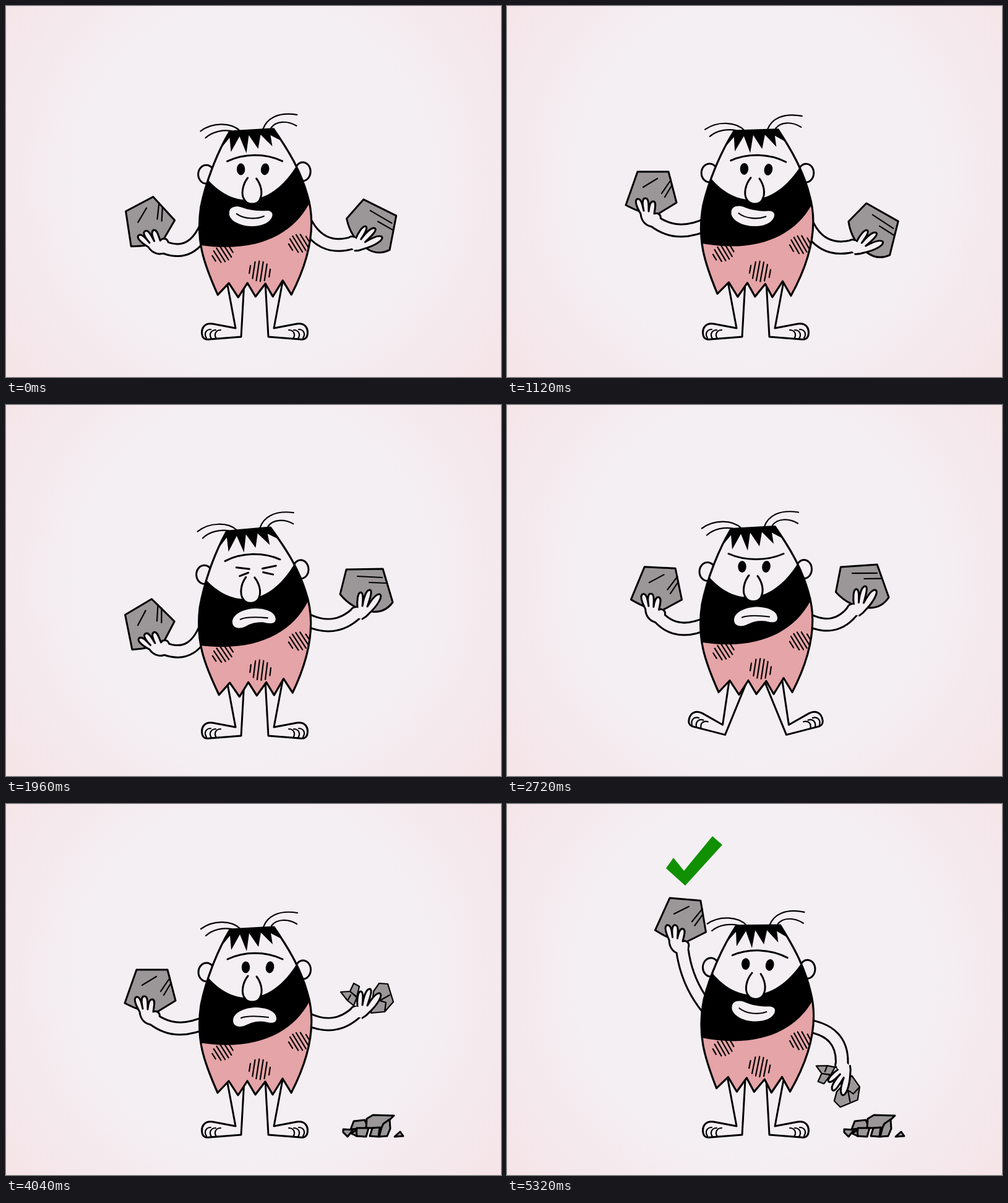
An HTML page that plays this animation: 800x600 px, repeating every 5.4 s.

```html
<!DOCTYPE html>
<html lang="en">
<head>
<meta charset="utf-8">
<title>Weighing stones</title>
<style>
html, body { margin: 0; width: 100%; height: 100%; overflow: hidden; background: #f4eff3; }
svg { display: block; width: 800px; height: 600px; }
path, ellipse { stroke-linejoin: round; stroke-linecap: round; }
.line { fill: none; stroke: #000; stroke-width: 3; }
.thin { fill: none; stroke: #000; stroke-width: 2.2; }
.skin { fill: #f4eff3; stroke: #000; stroke-width: 3; }
.plain { fill: #f4eff3; }
.rock { fill: #9b9799; stroke: #000; stroke-width: 3; }
.arm, .armFill { fill: none; stroke-linecap: butt; }
.arm { stroke: #000; stroke-width: 22.6; }
.armFill { stroke: #f4eff3; stroke-width: 16.6; stroke-linecap: round; }
</style>
</head>
<body>
<svg viewBox="0 0 800 600">
  <defs>
    <radialGradient id="bg" gradientUnits="userSpaceOnUse" cx="400" cy="280" r="510">
      <stop offset=".55" stop-color="#f4eff3"/>
      <stop offset="1" stop-color="#f5e4e8"/>
    </radialGradient>
    <path id="shape" d="M362 203L433 199C453 228 475 262 487 305C501 350 493 405 461 467L447 444L431 470L419 449L403 470L390 448L375 471L360 448L342 467C319 415 307 380 315 325C323 285 341 238 362 203Z"/>
    <clipPath id="inside"><use href="#shape"/></clipPath>
    <path id="toe" class="thin" d="M324 537C319 529 324 523 331 523"/>
    <g id="leg">
      <path class="skin" d="M357 446L371 521L334 514C320 512 315 522 317 532C318 538 323 540 329 539L380 535L385 446"/>
      <use href="#toe"/><use href="#toe" x="8" y="1"/><use href="#toe" x="16" y="1"/>
    </g>
  </defs>
  <rect width="800" height="600" fill="url(#bg)"/>

  <g id="legL"><use href="#leg"/></g>
  <g id="legR"><use href="#leg" transform="translate(804 0) scale(-1 1)"/></g>

  <path id="armL" class="arm"/>
  <g id="handL"><g transform="translate(-238 -348)">
    <path class="rock" d="M211 268L261 268L274 318L243 337Q222 338 192 322Z"/>
    <path class="thin" d="M220 293L243 279M250 303L265 281M255 309L267 289"/>
    <path class="skin" d="M240 357C225 358 217 348 216 336C210 326 205 314 211 312C217 311 219 322 221 331C218 318 219 310 224 311C229 311 229 320 229 332C230 322 232 315 237 316C242 318 239 327 238 336C242 334 250 336 248 345"/>
  </g></g>
  <path id="fillL" class="armFill"/>

  <path id="armR" class="arm"/>
  <g id="handR"><g transform="translate(-567 -336)">
    <g id="whole">
      <path class="rock" d="M550 266L609 265L625 319Q612 337 590 334Q560 331 540 306Z"/>
      <path class="thin" d="M568 277L608 279M587 287L614 288"/>
    </g>
    <path id="broken" class="rock" style="stroke-width:2.2" d="M541 304L556 303L567 313L562 326L552 318ZM562 290L571 295L567 312L556 303ZM552 318L557 309M603 290L617 291L626 320L612 336L590 338L594 303ZM604 318L620 309M604 318L614 321L612 336"/>
    <path class="skin" d="M560 343C553 332 560 324 568 329C567 318 568 304 573 303C578 303 577 315 576 325C578 312 582 299 588 299C593 300 588 314 584 326C590 316 598 305 604 306C610 309 600 325 587 337Q582 343 576 346"/>
  </g></g>
  <path id="fillR" class="armFill"/>

  <g id="body">
    <ellipse class="skin" cx="324" cy="272" rx="13" ry="15"/>
    <ellipse class="skin" cx="480" cy="268" rx="12.5" ry="15"/>
    <path class="thin" d="M379 202C365 188 335 187 315 202M365 202C352 200 335 202 323 213M416 199C422 182 440 171 471 176M429 197C437 186 455 185 470 194"/>
    <use href="#shape" fill="#e5a4a7"/>
    <g clip-path="url(#inside)">
      <path class="plain" d="M300 190H500V300L400 340L300 300Z"/>
      <path d="M300 240C345 332 425 340 475 250L510 280L490 320C462 373 398 403 300 384Z"/>
      <path d="M362 203L433 199L447 219L428 209L431 227L412 208L408 231L393 209L389 238L378 211L364 236L362 213L347 231Z"/>
    </g>
    <use href="#shape" fill="none" stroke="#000" stroke-width="3.2" stroke-linejoin="round"/>
    <path id="patches" class="thin"/>
    <path id="brow" class="line"/>
    <g id="eyes">
      <g id="open">
        <ellipse cx="380" cy="264" rx="6.7" ry="9.5"/>
        <ellipse cx="419" cy="264" rx="6.7" ry="9.5" transform="rotate(9 419 264)"/>
      </g>
      <path id="shut" class="line" d="M370 262l21 3M375 276l14 -5M412 265l22 -4M413 271l16 4"/>
    </g>
    <path class="skin" d="M391 278C383 288 379 305 386 314C391 322 405 322 410 314C417 302 411 287 405 279"/>
    <g id="smile">
      <path class="plain" d="M361 334C361 325 372 322 382 326C395 331 410 332 423 331C434 332 432 342 425 348C412 359 385 358 372 350C365 346 360 340 361 334Z"/>
      <path class="thin" d="M373 336C385 345 405 345 417 340"/>
    </g>
    <g id="frown">
      <path class="plain" d="M367 350C367 338 385 329 405 329C425 330 437 337 437 347C437 355 428 355 418 352C405 350 395 354 387 358C377 362 367 360 367 350Z"/>
      <path class="thin" d="M380 346C390 342 408 343 424 345"/>
    </g>
  </g>

  <g id="debris">
    <path class="rock" d="M562 513L580 511L585 524L557 526Z"/>
    <path class="rock" d="M583 509L593 503L627 504L606 524L582 524Z"/>
    <path class="rock" d="M610 517L620 510L621 525L616 537L603 538L607 523Z"/>
    <path class="rock" d="M567 524L586 524L582 538L566 537Z"/>
    <path class="rock" d="M592 524L604 523L602 538L588 537Z"/>
    <path class="rock" d="M545 526L561 527L552 538L545 531Z"/>
    <path class="rock" d="M558 533L566 527L567 537Z"/>
    <path class="rock" d="M628 538L637 530L642 537Z"/>
  </g>
  <path id="check" fill="#109000" d="M257 104L269 87L286 108L332 52L348 66L288 132Z"/>
</svg>
<script>
const LOOP = 5400, STEP = 40, CRACK = 2880;
const $ = id => document.getElementById(id);
const set = (id, name, value) => $(id).setAttribute(name, value);
const show = (id, on) => set(id, "visibility", on ? "visible" : "hidden");
const clamp = x => Math.max(0, Math.min(1, x));
const ease = x => x * x * (3 - 2 * x);

// Three poses per arm; a level from 0 to 2 blends through them
const leftPoses = [
  { x: 255, y: 390, turn: -28, bx: 302, by: 409, sy: 352, flip: 1 },
  { x: 238, y: 348, turn: 0, bx: 275, by: 376, sy: 352, flip: 1 },
  { x: 283, y: 234, turn: 5, bx: 290, by: 290, sy: 332, flip: 1 }
];
const rightPoses = [
  { x: 541, y: 423, turn: 50, bx: 545, by: 366, sy: 358, flip: -1 },
  { x: 560, y: 388, turn: 30.5, bx: 505, by: 402, sy: 345, flip: 1 },
  { x: 567, y: 336, turn: 0, bx: 530, by: 371, sy: 345, flip: 1 }
];

function blend(poses, level) {
  const i = level < 1 ? 0 : 1, p = level - i, mix = {};
  for (const k in poses[i]) mix[k] = poses[i][k] + (poses[i + 1][k] - poses[i][k]) * p;
  return mix;
}

// side is 1 for the left arm, -1 for the right; pull draws the hand up and in
function drawArm(name, side, pose, shoulder, pull) {
  const x = pose.x + side * 7 * pull, y = pose.y - 5 * pull;
  const d = `M${x} ${y}Q${pose.bx} ${pose.by} ${shoulder} ${pose.sy}`;
  set("arm" + name, "d", d);
  set("fill" + name, "d", d);
  set("hand" + name, "transform",
    `translate(${x} ${y}) rotate(${pose.turn + side * 3 * pull}) scale(1 ${pose.flip})`);
}

// Slanted strokes that fill a rounded patch
function hatch(cx, cy, width, rise, dx, dy) {
  let d = "";
  for (let i = 0; i < 6; i++) {
    const u = i / 2.5 - 1, half = Math.sqrt(1 - 0.85 * u * u);
    const x = cx + u * width, y = cy + u * rise;
    d += `M${x - dx * half} ${y - dy * half}L${x + dx * half} ${y + dy * half}`;
  }
  return d;
}
set("patches", "d",
  hatch(350, 401, 14, -7, 7, 11) + hatch(410, 429, 16, 3, -2.5, 16) + hatch(474, 384, 14, -6, 8, 13));

function drawDebris(t) {
  show("debris", t >= CRACK);
  [...$("debris").children].forEach((chunk, i) => {
    const p = clamp((t - CRACK - i * 18) / 330), left = 1 - p;
    const spin = (i % 2 ? 70 : -60) * left;
    chunk.setAttribute("transform",
      `translate(${-8 * left} ${-205 * (1 - p * p)}) rotate(${spin} 590 522)`);
  });
}

function draw(t) {
  const ramp = (from, to) => ease(clamp((t - from) / (to - from)));

  const swap = ramp(1640, 1920);
  const left = ramp(40, 480) + 1.1 * (ramp(2400, 2660) - swap) + ramp(4640, 5080);
  const right = 1.1 - 0.1 * ramp(0, 480) + 0.2 * ramp(1240, 1520) + 0.8 * swap - 2 * ramp(4640, 5120);
  const anger = ramp(2400, 2520) - ramp(2920, 3040);
  drawArm("L", 1, blend(leftPoses, left), 325, anger);
  drawArm("R", -1, blend(rightPoses, right), 482, anger);

  // The body leans away from the higher hand's reach and rises with the jump
  const lean = 2.7 * Math.tanh(0.65 * (left + 1 - right));
  const lift = -4.5 * Math.max(0, left - 1) - 2.5 * anger;
  set("body", "transform", `translate(0 ${lift}) rotate(${lean} 402 390)`);
  const splay = 19 * (ramp(2480, 2640) - ramp(2740, 2880));
  set("legL", "transform", `rotate(${splay} 371 452)`);
  set("legR", "transform", `rotate(${-splay} 433 452)`);

  const end = 251 - 8 * anger, bow = 238 + 17 * anger;
  set("brow", "d", `M358 ${end}C385 ${bow} 420 ${bow} 447 ${end}`);
  const look = -10 * ramp(1240, 1360) + 16 * ramp(1760, 1920) - 6 * ramp(2360, 2460)
    + 7.5 * (ramp(2960, 3080) - ramp(4120, 4280));
  set("eyes", "transform", `translate(${look} 0)`);
  const blink = t >= 1880 && t < 2040;
  show("open", !blink);
  show("shut", blink);
  const happy = t < 1240 || t >= 4300;
  show("smile", happy);
  show("frown", !happy);

  show("whole", t < CRACK);
  show("broken", t >= CRACK);
  drawDebris(t);

  const pop = ramp(4920, 5120);
  show("check", pop > 0);
  set("check", "transform", `translate(302 92) scale(${pop}) translate(-302 -92)`);
}

function tick() {
  const t = performance.now() % LOOP;
  draw(Math.floor(t / STEP) * STEP);
  requestAnimationFrame(tick);
}
tick();
</script>
</body>
</html>
```
